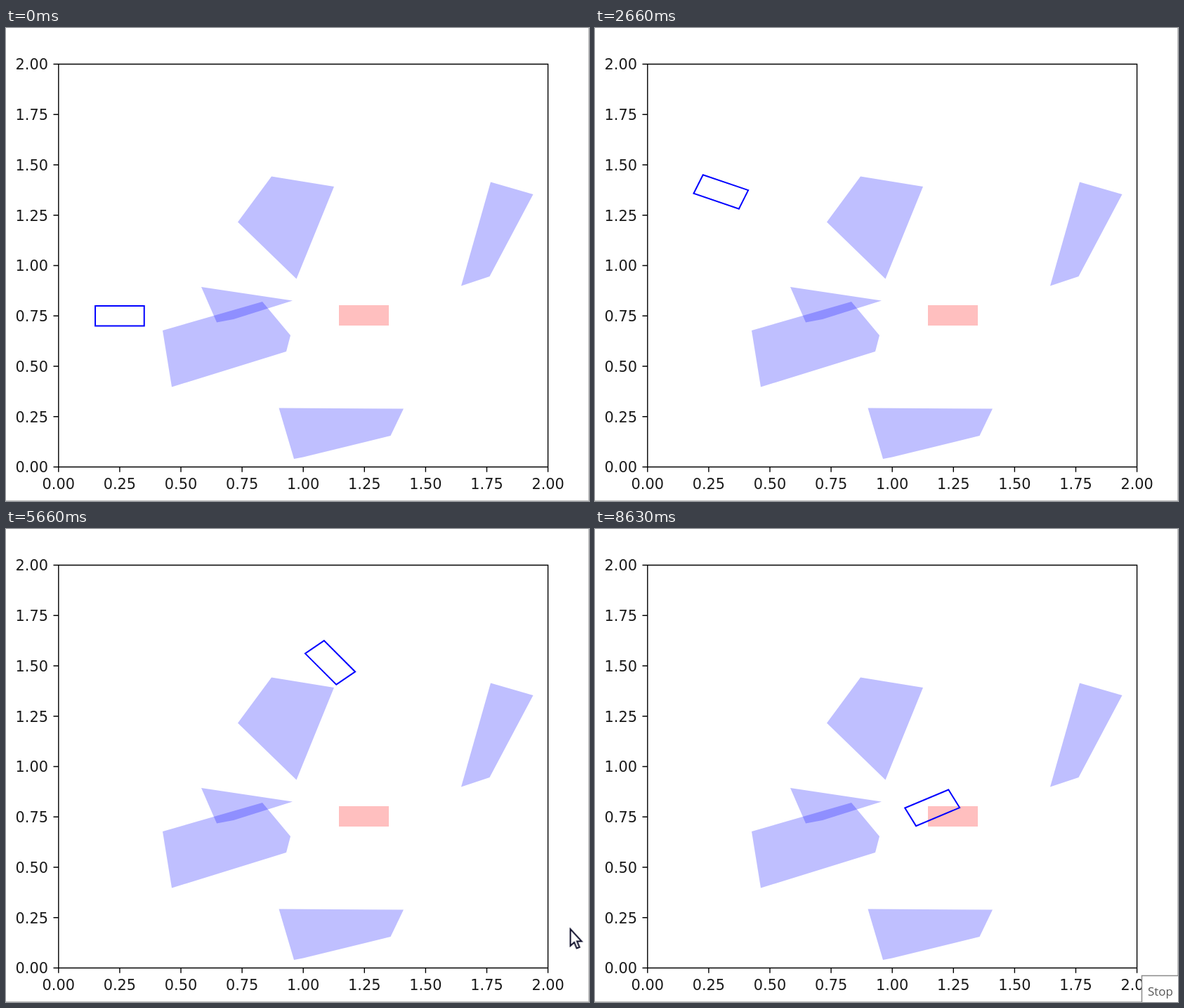
Write an HTML page that moves like this. It is 830 px wide and 674 px high and loops after 9.85 s.

```html
<!DOCTYPE html>
<html lang="en">
<head>
<meta charset="utf-8">
<title>Path planning</title>
<style>
html, body { margin: 0; width: 100%; height: 100%; overflow: hidden; background: #fff; }
svg { display: block; width: 830px; height: 674px; }
#axes { stroke: #000; stroke-width: 1.4; fill: none; }
#labels { font: 20.83px "DejaVu Sans", sans-serif; fill: #1a1a1a; }
#obstacles { fill: #00f; fill-opacity: .25; }
#car { fill: none; stroke: #00f; stroke-width: 2; }
#pointer { fill: #fff; stroke: #10102c; stroke-width: 2; animation: point 9850ms linear infinite; }
#tip { animation: show 9850ms step-end infinite; }
#tip text { font: 17px "Open Sans", "Noto Sans", sans-serif; fill: #575757; }
@keyframes point {
  0%, 7.3% { transform: translate(840px, 540px); }
  8.6% { transform: translate(798px, 537px); }
  12.28%, 12.9% { transform: translate(829px, 537px); }
  13%, 44% { transform: translate(840px, 548px); }
  49% { transform: translate(803.5px, 547px); }
  57.4%, 60.8% { transform: translate(803.5px, 570px); }
  68.5%, 100% { transform: translate(764px, 682px); }
}
@keyframes show {
  0% { visibility: hidden; }
  79.5%, 100% { visibility: visible; }
}
</style>
</head>
<body>
<svg viewBox="0 0 830 674">
  <path d="M829.5 0V674M0 673.5H830" stroke="#bdbdbd" fill="none"/>
  <g id="obstacles">
    <path d="M378 211.5L467 226 413.5 357.5 330 276.5Z"/>
    <path d="M690 219.5L750.5 237 688.5 354 648 367.5Z"/>
    <path d="M278 369L408 388.5 324 415 300 419.5Z"/>
    <path d="M223 431L365 390 405 438 399 461 236 511.5Z"/>
    <path d="M388.5 541.5L566 542.5 547.5 581 423 611.5 410 614Z"/>
  </g>
  <rect x="474" y="395" width="71" height="29" fill="#ffbfbf"/>
  <path id="car"/>
  <path id="axes"/>
  <g id="labels"></g>
  <g id="tip">
    <rect x="778.5" y="636.5" width="60" height="50" fill="#fff" stroke="#8a8a8a" stroke-width="1.5"/>
    <text x="787" y="665">Stop</text>
  </g>
  <path id="pointer" d="M0 0V24L5.5 19 9 27.5 13 26 9.5 17.5H16Z"/>
</svg>
<script>
const LOOP = 9850;
const X = x => 74.8 + 348.4 * x;
const Y = y => 625.5 - 287 * y;
const el = id => document.getElementById(id);
const rad = d => d * Math.PI / 180;

function drawAxes() {
  let lines = `M${X(0)} ${Y(0)}H${X(2)}V${Y(2)}H${X(0)}Z`;
  let text = '';
  for (let v = 0; v <= 2; v += 0.25) {
    const s = v.toFixed(2);
    lines += `M${X(v)} ${Y(0)}v7.3M${X(0)} ${Y(v)}h-7.3`;
    text += `<text x="${X(v)}" y="656.5" text-anchor="middle">${s}</text>` +
            `<text x="60" y="${Y(v) + 7.9}" text-anchor="end">${s}</text>`;
  }
  el('axes').setAttribute('d', lines);
  el('labels').innerHTML = text;
}

// Legs of the drive, alternately forward and in reverse.
// Each stop: time in ms, x, y, heading in degrees
const legs = [
  [[730, .25, .75, 0], [1210, .44, .822, 44], [1710, .545, 1.014, 79],
   [2660, .3, 1.366, 157.6], [2900, .272, 1.372, 172]],
  [[4010, .639, 1.666, 217], [4940, 1.122, 1.846, 234]],
  [[5660, 1.11, 1.516, 309.5], [6820, 1.524, 1.166, 343], [7300, 1.584, 1.155, 355]],
  [[8630, 1.1635, .795, 387]]
];

const stops = legs.flatMap((leg, i) => leg.map(stop => ({ stop, gear: i % 2 ? -1 : 1 })));

// value and slope of a cubic from p to q with end slopes m and n
function cubic(u, p, q, m, n) {
  const c = 3 * (q - p) - 2 * m - n, e = 2 * (p - q) + m + n;
  return [p + u * (m + u * (c + u * e)), m + u * (2 * c + 3 * u * e)];
}

function poseAt(time) {
  const t = Math.min(Math.max(time, 730), 8630);
  const i = Math.max(1, stops.findIndex(s => s.stop[0] >= t));
  const { stop: [t1, x1, y1, h1], gear } = stops[i];
  const [t0, x0, y0, h0] = stops[i - 1].stop;
  const u = (t - t0) / (t1 - t0), a = rad(h0), b = rad(h1);
  // this pull makes the cubic close to a circular arc
  const pull = gear * Math.hypot(x1 - x0, y1 - y0) / Math.cos((b - a) / 4) ** 2;
  const [x, dx] = cubic(u, x0, x1, pull * Math.cos(a), pull * Math.cos(b));
  const [y, dy] = cubic(u, y0, y1, pull * Math.sin(a), pull * Math.sin(b));
  return [x, y, Math.atan2(dy, dx)];
}

function drawCar(time) {
  const [x, y, a] = poseAt(time);
  const c = Math.cos(a), s = Math.sin(a);
  const corners = [[-.1, -.05], [.1, -.05], [.1, .05], [-.1, .05]].map(([p, q]) =>
    `${X(x + p * c - q * s).toFixed(2)} ${Y(y + p * s + q * c).toFixed(2)}`);
  el('car').setAttribute('d', `M${corners.join('L')}Z`);
}

let start;
function tick(now) {
  start ??= now;
  drawCar((now - start) % LOOP);
  requestAnimationFrame(tick);
}

drawAxes();
drawCar(0);
requestAnimationFrame(tick);
</script>
</body>
</html>
```
